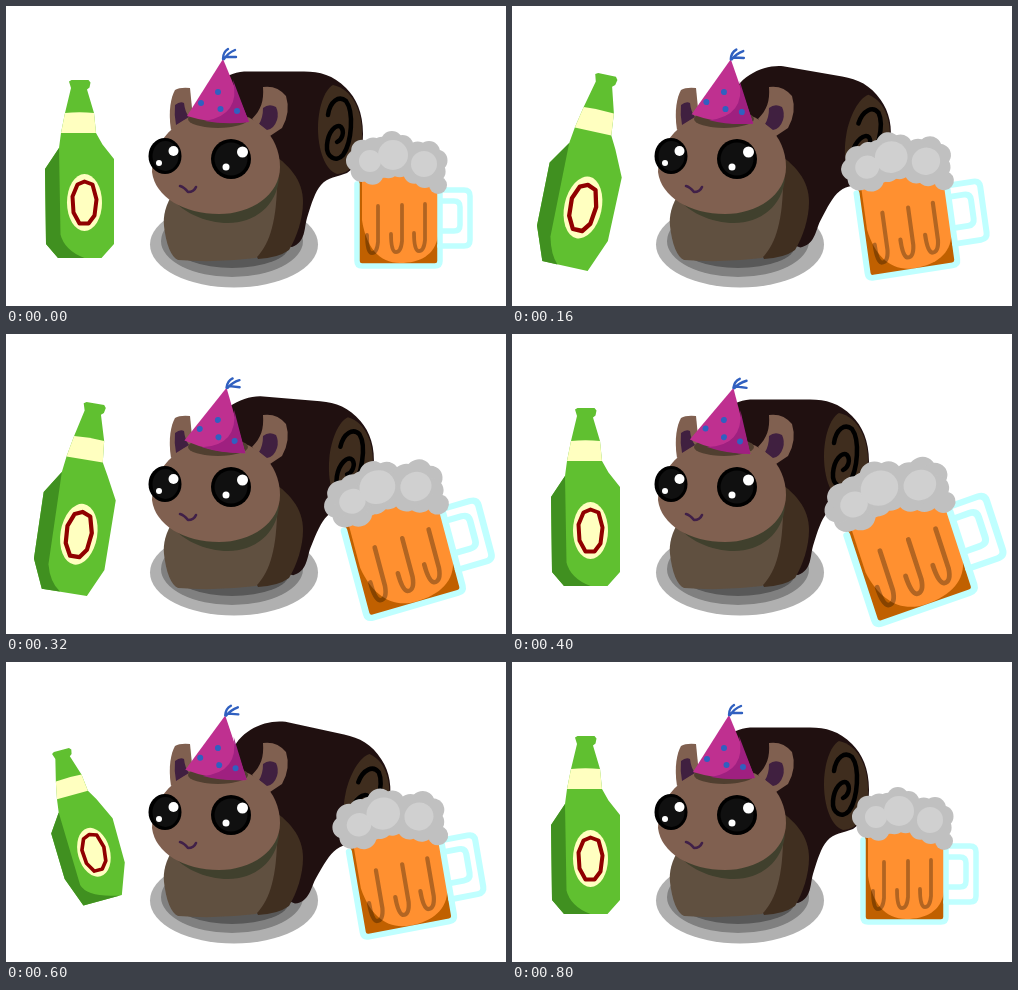
Write an HTML page that moves like this. It is 500 by 300 pixels and loops after 840 ms.

```html
<!DOCTYPE html>
<html lang="en">
<head>
<meta charset="utf-8">
<title>Party squirrel</title>
<style>
html, body { margin: 0; width: 100%; height: 100%; overflow: hidden; background: #fff; }
svg { display: block; width: 100vw; height: 100vh; }
.line { fill: none; stroke-linecap: round; stroke-linejoin: round; }
</style>
</head>
<body>
<svg viewBox="0 0 500 300">
  <defs>
    <path id="drip" d="M0 0V36Q-1 48 -7 47Q-11 45 -11 29"/>
  </defs>

  <g id="plate">
    <ellipse cx="228" cy="238.500" rx="84" ry="43" fill="#b0b0b0"/>
    <ellipse cx="226" cy="235" rx="71" ry="36" fill="#808080"/>
    <ellipse cx="226" cy="240" rx="57" ry="22" fill="#585858"/>
  </g>

  <g id="tail">
    <path fill="#201010" d="M286 241C300 236 298 222 301 212C306 196 309 186 315 179C322 171 331 171 341 167C352 160 357 146 357 128C357 106 350 92 340 82C327 69 314 65.500 298 65.500H238C218 67 194 84 192 108L205 180L250 235Z"/>
    <path fill="#3f2d1e" d="M327 79C318 84 312 103 312 122C312 144 319 164 331 168C344 168 356 154 356 128C356 104 346 83 327 79Z"/>
    <path class="line" stroke="#000" stroke-width="4.500" d="M322 109C324 95 333 89 340 95C348 106 346 136 337 149C330 157 320 151 321 139C322 126 330 117 335 121C339 126 336 134 331 136"/>
  </g>

  <g id="body">
    <path fill="#402f20" d="M262 145C283 158 297 174 297 196C297 212 291 231 283 244Q272 252 252 253L225 200Z"/>
    <path fill="#605040" d="M168 185C159 200 157 210 158 220C160 238 165 251 172 254Q210 257 250 252C262 240 270 220 271 180Z"/>
    <path fill="#40402d" d="M160 185C174 207 200 217 222 217C248 217 271 200 273 172Z"/>
  </g>

  <g id="head">
    <path fill="#806050" d="M165 124C162 105 165 91 169 84Q174 81 184 82Q185 92 187 112Z"/>
    <path fill="#402040" d="M169 99Q174 95 178 97Q179 106 183 111L170 119Q168 109 169 99Z"/>
    <path fill="#806050" d="M246 113C255 104 258 95 257 81Q271 79 280 90Q285 106 276 122L264 130Z"/>
    <path fill="#402040" d="M257 102Q263 97 270 101Q273 107 271 114Q268 123 261 124L253 118Q257 112 257 102Z"/>
    <path fill="#806050" d="M146 166C146 130 180 105 214 105C248 105 274 129 274 161C274 189 245 208 213 208C178 208 149 191 146 166Z"/>
    <ellipse cx="212" cy="113" rx="30" ry="9" fill="#503f30"/>
    <ellipse cx="159" cy="150" rx="16.500" ry="18"/>
    <ellipse cx="159.500" cy="150" rx="13" ry="15" fill="#101010"/>
    <circle cx="225" cy="153" r="20"/>
    <circle cx="225" cy="153" r="16.500" fill="#101010"/>
    <g fill="#fff">
      <circle cx="167.500" cy="145" r="5"/><circle cx="153" cy="157" r="3"/>
      <circle cx="236.500" cy="146" r="5.500"/><circle cx="220" cy="161" r="3.500"/>
    </g>
    <path class="line" stroke="#402048" stroke-width="2.600" d="M174 180Q178 181 182 186Q188 186 190 181"/>
  </g>

  <g id="hat">
    <path fill="#bf3090" d="M217 53L181 110Q210 119 243 116Z"/>
    <path fill="#9f2080" d="M227 74Q235 109 199 115Q220 119 243 116Z"/>
    <g fill="#3060c0">
      <circle cx="195" cy="97" r="3"/><circle cx="212" cy="86" r="3"/>
      <circle cx="214.500" cy="103" r="3"/><circle cx="231" cy="105" r="3"/>
    </g>
    <path class="line" stroke="#3060c0" stroke-width="2.400" d="M217 53Q217 46 222 43M218 53Q222 47 229 44M220 51H230"/>
  </g>

  <g id="bottle">
    <path id="glass" fill="#60c030"/>
    <path id="shade" fill="#409020"/>
    <path fill="#ffffc0" d="M-19.500 -89.500Q-5 -91 9.500 -89.500L11.500 -69.500H-23.500Z"/>
    <ellipse rx="17.500" ry="28.500" fill="#ffffc0"/>
    <path class="line" stroke="#900000" stroke-width="4" d="M-7 -18L0 -21L8 -18L12 -3L10 13L4 21L-5 21L-11 10L-12 -6Z"/>
  </g>

  <g id="mug">
    <path fill="#c06000" d="M353 170H432V258H353Z"/>
    <path fill="#ff9030" d="M356 168H432V230C429 249 414 257 394 257C373 257 360 241 356 214Z"/>
    <g class="line" stroke="#000" stroke-opacity=".3" stroke-width="3.800">
      <use href="#drip" x="372" y="200"/>
      <use href="#drip" x="396" y="199"/>
      <use href="#drip" x="419" y="198"/>
    </g>
    <g class="line" stroke="#c0ffff" stroke-width="5.500">
      <path d="M351 178V255Q351 260 356 260H429Q434 260 434 255V178"/>
      <path d="M434 184H458Q464 184 464 190V234Q464 240 458 240H434"/>
      <path d="M436 195H448Q454 195 454 201V219Q454 225 448 225H436"/>
    </g>
    <g id="foam"></g>
  </g>
</svg>
<script>
const LOOP = 840, STEP = 40;
const $ = id => document.getElementById(id);
const move = (id, value) => $(id).setAttribute("transform", value);

function dot(cx, cy, r, fill) {
  const c = document.createElementNS("http://www.w3.org/2000/svg", "circle");
  for (const [k, v] of Object.entries({ cx, cy, r, fill })) c.setAttribute(k, v);
  $("foam").append(c);
}

// Each foam lump is a disc with a scalloped rim and a lighter centre
const lumps = [[364, 155, 11], [387, 149, 15], [418, 158, 13]];
for (const [x, y] of lumps) {
  dot(x, y, 20, "#c0c0c0");
  for (let i = 0; i < 7; i++) {
    const a = x + i * 2 * Math.PI / 7;
    dot(x + 13 * Math.cos(a), y + 13 * Math.sin(a), 11, "#c0c0c0");
  }
}
dot(432, 179, 9, "#c0c0c0");
for (const [x, y, r] of lumps) dot(x, y, r, "#d0d0d0");

// Rises from 0 to 1 at peak, then falls back to 0 at end
const tent = (t, peak, end) => Math.max(0, Math.min(t / peak, (end - t) / (end - peak)));

// Around the label's centre; the corners soften as the bottle leans
function poseBottle(lean) {
  const k = Math.abs(lean);
  const shoulder = -43.5 + 14 * k, corner = 41.5 - 25 * k;
  $("glass").setAttribute("d", `M-15.5 -121L-13 -122.5H4L6 -120L5 -115L2.5 -113L9.5 -89.5L11.5 -69.5L18 -58
    L29.5 ${shoulder}V${corner}L17 55.5H-26.5L-38.5 ${corner}L-39.5 -33.5L-25.5 -54.5L-23.5 -69.5L-19.5 -89.5L-13.5 -114.5Z`);
  $("shade").setAttribute("d", `M-25.5 -54.5L-39.5 -33.5L-38.5 ${corner}L-26.5 55.5H${-18 * lean}Q-20 48 -24 32Z`);
  move("bottle", `translate(${78.5 - 11.3 * lean} ${196.5 + 7.5 * lean})
    rotate(${18.5 * lean}) scale(${1 + .1 * lean} ${1 + .15 * lean})`);
}

// Pivots on its lower left corner while growing and slanting
function poseMug(k) {
  move("mug", `translate(${350 + 13.75 * k} ${262 + 32 * k})
    matrix(${1 + .2 * k} ${-.42 * k} ${.36 * k} ${1 + .1 * k} 0 0) translate(-350 -262)`);
}

function draw(t) {
  const slow = tent(t, 400, 800);
  const fast = tent(t % 400, 200, 400);
  const lean = tent(t, 240, 400) - tent(800 - t, 240, 400);
  move("tail", `rotate(${12.3 * fast} 285 255)`);
  move("hat", `rotate(${8 * slow} 212 85)`);
  poseMug(slow);
  poseBottle(lean);
}

const start = performance.now();
function tick() {
  const t = (performance.now() - start) % LOOP;
  draw(Math.floor(t / STEP) * STEP);
  requestAnimationFrame(tick);
}
tick();
</script>
</body>
</html>
```
